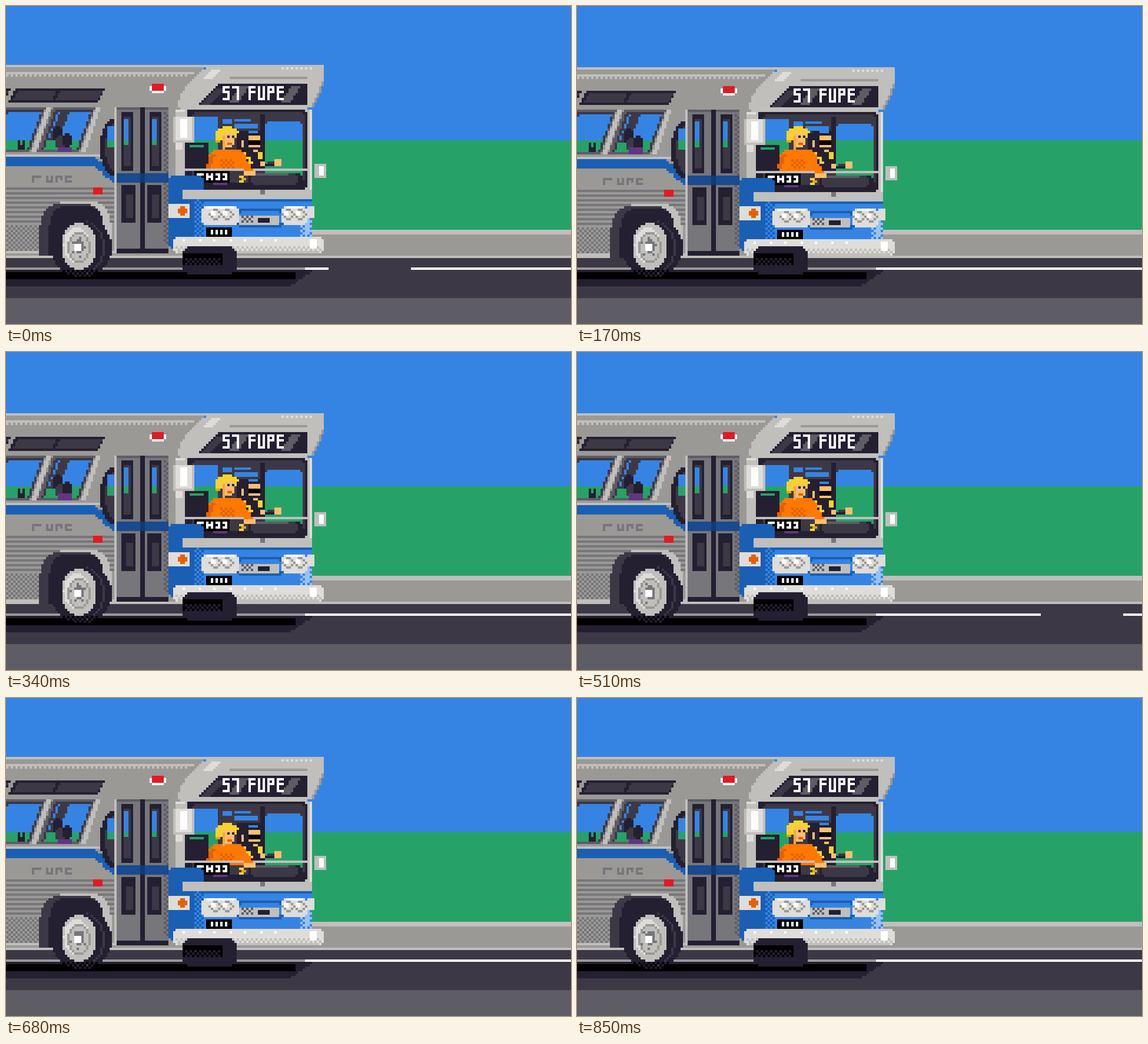
Recreate the animation shown at these times as an HTML page with a canvas. Size 960 by 540 pixels, loop 1.02 s.

```html
<!DOCTYPE html>
<html lang="en">
<head>
<meta charset="utf-8">
<title>Bus ride</title>
<style>
  html, body { margin: 0; width: 100%; height: 100%; overflow: hidden; background: #3584e4; }
  canvas { display: block; width: 960px; height: 540px; image-rendering: pixelated; }
</style>
</head>
<body>
<canvas id="stage" width="240" height="135"></canvas>
<script>
const ctx = document.getElementById('stage').getContext('2d');
const STEP = 170, COUNT = 6, HORIZON = 57;
const SKY = '#3584e4', GRASS = '#26a269', GLASS = 'glass';
const BLACK = '#000', INK = '#241f31', DARK = '#3d3846', SLATE = '#5e5c64', STEEL = '#77767b';
const GRAY = '#9a9996', SILVER = '#c0bfbc', PALE = '#deddda', WHITE = '#fff';
const NAVY = '#1a5fb4', RED = '#e01b24', ORANGE = '#ff7800', RUST = '#e66100';
const SKIN = '#ffbe6f', TAN = '#ffa348', GOLD = '#e5a50a', YELLOW = '#f6d32d', PURPLE = '#613583';

let oy = 0; // vertical offset of the part being drawn

// Glass shows the scenery behind, split at the fixed horizon
function row(c, x, y, w) {
  y += oy;
  ctx.fillStyle = c === GLASS ? (y < HORIZON ? SKY : GRASS) : c;
  ctx.fillRect(Math.round(x), y, Math.round(w), 1);
}

function rect(c, x, y, w, h = 1) {
  for (let j = 0; j < h; j++) row(c, x, y + j, w);
}

function dots(c, x, y, w, h) {
  for (let j = 0; j < h; j++)
    for (let i = j % 2; i < w; i += 2) row(c, x + i, y + j, 1);
}

// Rounded rectangle
function box(c, x, y, w, h, r = 1) {
  for (let j = 0; j < h; j++) {
    const d = Math.max(0, r - Math.min(j, h - 1 - j) - 0.5);
    const inset = Math.round(r - Math.sqrt(r * r - d * d));
    row(c, x + inset, y + j, w - 2 * inset);
  }
}

// Parallelogram leaning left by dx towards its foot
function slant(c, x, y, w, h, dx) {
  for (let j = 0; j < h; j++) row(c, x - Math.round(dx * (j + 0.5) / h), y + j, w);
}

// Arch that widens downwards, squarer for larger n
function dome(c, x, y, w, h, n = 4) {
  for (let j = 0; j < h; j++) {
    const half = Math.round(w / 2 * (1 - (1 - (j + 0.5) / h) ** n) ** (1 / n));
    row(c, x + w / 2 - half, y + j, 2 * half);
  }
}

function oval(c, x, y, w, h) {
  for (let j = 0; j < h; j++) {
    const t = (2 * j + 1) / h - 1;
    const half = Math.round(w / 2 * Math.sqrt(1 - t * t));
    row(c, x + w / 2 - half, y + j, 2 * half);
  }
}

const segments = {
  5: 'afgcd', 7: 'abc', 3: 'abgcd', C: 'afed', E: 'afged', F: 'afge',
  H: 'fegbc', P: 'abfge', U: 'febcd'
};

// Segment lettering, w by h cells per glyph
function sign(text, c, x, y, h, w = 3) {
  const mid = Math.floor((h - 1) / 2);
  [...text].forEach((ch, i) => {
    const px = x + i * (w + 1), has = s => (segments[ch] || '').includes(s);
    if (has('a')) rect(c, px, y, w);
    if (has('g') && (h > 3 || !has('a'))) rect(c, px, y + mid, w);
    if (has('d')) rect(c, px, y + h - 1, w);
    if (has('f')) rect(c, px, y, 1, mid + 1);
    if (has('e')) rect(c, px, y + mid, 1, h - mid);
    if (has('b')) rect(c, px + w - 1, y, 1, mid + 1);
    if (has('c')) rect(c, px + w - 1, y + mid, 1, h - mid);
  });
}

function scenery(i) {
  rect(SKY, 0, 0, 240, HORIZON);
  rect(GRASS, 0, HORIZON, 240, 38);
  rect(SILVER, 0, 95, 240, 2);
  rect(GRAY, 0, 97, 240, 9);
  rect(SILVER, 0, 106, 240);
  rect(DARK, 0, 107, 240, 17);
  rect(SLATE, 0, 124, 240, 11);

  // the gap in the lane line runs one stage width per step
  const loop = 780, gap = (137 - 240 * i + 2 * loop) % loop;
  rect(GRAY, 0, 111, 127);
  rect(WHITE, 127, 111, 113);
  rect(DARK, gap, 111, 35);

  for (let j = 0; j < 7; j++) rect(INK, 0, 112 + j, 130 - 1.5 * j);
  rect(BLACK, 0, 113, 123, 3);
}

function side() {
  rect(GRAY, 0, 25, 84, 80);
  rect(SILVER, 0, 25, 90);
  rect(SILVER, 0, 28, 80);
  dots(SILVER, 0, 29, 78, 1);

  for (const x of [-18, 4, 22]) {
    slant(INK, x, 35, 20, 6, 3);
    slant(DARK, x + 1, 36, 18, 4, 2);
  }
  for (const x of [-1, 20]) {
    slant(SLATE, x, 43, 18, 19, 7);
    slant(DARK, x + 1, 44, 16, 17, 6);
    slant(GLASS, x + 2, 45, 14, 16, 6);
    slant(SILVER, x + 18, 43, 2, 19, 6);
  }
  slant(DARK, 23, 45, 4, 12, 5);

  rect(SILVER, 0, 63, 40);
  for (let x = 0; x < 47; x++) {
    const t = Math.min(1, Math.max(0, (x - 36) / 10));
    rect(NAVY, x, 64 + Math.round(7 * t * t * (3 - 2 * t)), 1, 4);
  }

  sign('F', STEEL, 11, 72, 3, 4);
  sign('UPE', STEEL, 17, 72, 3);

  for (let y = 77; y < 92; y += 2) rect(STEEL, 0, y, 47);
  dots(STEEL, 0, 93, 15, 11);
  rect(SILVER, 0, 104, 46);
  rect(WHITE, 61, 34, 7, 2);
  rect(WHITE, 62, 36, 5);
  rect(RED, 62, 33, 5, 3);
  rect(RED, 37, 77, 4, 3);

  oval(INK, 40, 48, 12, 24);
  oval(DARK, 42, 50, 10, 20);
  rect(GLASS, 43, 51, 3, 9);
}

function passengers(drop) {
  for (const x of [5, 7]) rect(INK, x, 57, 1, 4);
  rect(INK, 5, 59, 3, 2);
  oval(INK, 20, 51, 4, 7);
  oval(DARK, 21, 55, 4, 6);
  oval(INK, 24, 54, 4, 6);
  rect(PURPLE, 22, 60 - drop, 6, 2 + drop);
}

function door() {
  rect(SILVER, 46, 43, 1, 62);
  rect(STEEL, 47, 43, 22, 61);
  rect(SLATE, 47, 43, 22);
  dots(SLATE, 67, 45, 2, 56);
  rect(INK, 57, 43, 2, 61);
  for (const [top, low] of [[49, 49], [61, 60]]) {
    box(INK, top, 45, 5, 25, 1.5);
    rect(DARK, top + 1, 47, 3, 21);
    rect(GLASS, top + 1, 48, 2, 11);
    rect(INK, low, 76, 6, 16);
    rect(DARK, low + 2, 80, 3, 10);
  }
  rect('#1a4a8f', 47, 71, 22, 4);
  rect('#123a73', 57, 71, 2, 4);
  rect(INK, 47, 103, 22, 2);
}

function brow() {
  for (let j = 0; j < 18; j++) {
    const left = Math.round(73 + 13 * (1 - j / 18) ** 2);
    const right = Math.round(130 + 5 * Math.cos((j - 4) / 14 * Math.PI / 2));
    rect(SILVER, left, 25 + j, right - left);
    if (j > 1 && j < 6) rect(PALE, left + 4, 25 + j, 4);
    if (j > 6) rect(GRAY, right - 1, 25 + j, 1);
  }
  dots(PALE, 117, 26, 13, 1);
  rect(GRAY, 95, 30, 33);

  for (let j = 0; j < 9; j++) rect(INK, 90 - j, 33 + j, 38 + j);
  slant(DARK, 89, 35, 4, 7, 6);
  slant(SLATE, 99, 34, 4, 7, 4);
  slant(SLATE, 121, 34, 4, 7, 4);
  sign('57', WHITE, 92, 34, 6);
  sign('FUPE', WHITE, 103, 34, 6);
}

function cab() {
  box(SILVER, 72, 43, 58, 39, 4);
  rect(PALE, 129, 44, 1, 36);
  box(INK, 76, 44, 52, 34, 3);
  box(DARK, 79, 45, 48, 30, 2);
  rect(GLASS, 80, 47, 10, 22);
  box(INK, 76, 58, 10, 12);
  rect(GLASS, 78, 59, 6);
  rect(DARK, 90, 46, 20, 23);
  rect(GLASS, 92, 48, 4, 2);
  rect(GLASS, 97, 48, 7);
  rect(GLASS, 97, 50, 10, 2);
  rect(INK, 98, 53, 10, 16);
  rect(INK, 108, 46, 2, 23);
  box(GLASS, 110, 49, 16, 28, 2);
}

function rider(head, torso) {
  oy = torso;
  dome(ORANGE, 85, 61, 17, 9);
  slant(RUST, 87, 63, 2, 6, 2);
  dots(RUST, 91, 65, 6, 4);

  oy = head;
  oval(YELLOW, 89, 51, 9, 6);
  rect(YELLOW, 89, 53, 10);
  rect(YELLOW, 89, 54, 3, 3);
  rect(GOLD, 89, 57, 2);
  rect(SKIN, 92, 54, 5, 5);
  rect(TAN, 92, 55, 1, 6);
  rect(SKIN, 93, 59, 3);
  rect(YELLOW, 92, 53, 6);
  for (const x of [94, 96]) rect(INK, x, 55, 1);
  rect(RUST, 94, 58, 2);
}

function driver(head, torso) {
  oy = head;
  box(INK, 99, 53, 10, 10, 2);
  rect(SKY, 103, 53, 4);
  rect(SKIN, 103, 55, 5, 6);
  rect(BLACK, 103, 57, 5, 2);
  rect(SKIN, 100, 57, 1, 3);
  rect(INK, 102, 60, 6);
  rect(SKIN, 105, 61, 2);

  oy = torso;
  dome(INK, 98, 62, 12, 8);
  for (let j = 0; j < 5; j++) rect(YELLOW, 100 + Math.min(j, 3), 62 + j, 2 - j % 2);
  rect(YELLOW, 107, 62, 2, 3);
}

function dash() {
  box(INK, 103, 71, 23, 7, 2);
  box(DARK, 104, 71, 20, 5, 2);
  rect(SLATE, 106, 71, 14);
  rect(DARK, 111, 66, 4);
  rect(INK, 110, 67, 7);
  rect(SKIN, 108, 66, 2, 2);
  rect(SKIN, 114, 65, 3, 3);
  rect(SILVER, 76, 69, 52);
  slant(ORANGE, 98, 65, 4, 6, -4);
  rect(SKIN, 101, 70, 5, 2);
  for (let j = 0; j < 3; j++) rect(j % 2 ? GOLD : YELLOW, 99 + j % 2, 72 + j, 2);
  rect(BLACK, 80, 70, 15, 5);
  sign('CH', WHITE, 81, 71, 3);
  sign('33', WHITE, 89, 71, 3, 2);
  rect(PURPLE, 88, 75, 6);
}

function lamp(x, w) {
  box(PALE, x, 85, w, 8, 2);
  rect(WHITE, x + 2, 85, w - 4);
  for (const i of [-5, 0]) {
    const px = Math.floor(x + w / 2) + i;
    oval(GRAY, px, 86, 5, 5);
    oval(PALE, px + 1, 87, 3, 3);
    rect(WHITE, px + 1, 87, 2, 2);
  }
}

function nose() {
  box(NAVY, 69, 72, 15, 31, 3);
  rect(SKY, 80, 82, 50, 16);
  dots(NAVY, 78, 82, 6, 16);
  box(SILVER, 75, 78, 55, 4, 1);
  rect(NAVY, 82, 82, 48);
  rect(STEEL, 108, 78, 2, 2);
  dots('#99c1f1', 125, 89, 5, 9);
  rect('#99c1f1', 127, 91, 2, 6);

  box(NAVY, 98, 86, 20, 8, 2);
  box(SKY, 99, 87, 18, 6, 2);
  box(SILVER, 99, 89, 17, 4, 1);
  dots(SLATE, 100, 89, 5, 3);
  rect(INK, 107, 90, 5, 2);
  lamp(83, 16);
  lamp(117, 11);
  rect(PALE, 128, 85, 3, 5);

  rect(BLACK, 85, 94, 11, 4);
  for (let x = 87; x < 95; x += 2) rect(WHITE, x, 95, 1, 2);

  rect(PALE, 69, 84, 9, 6);
  rect(RUST, 74, 85, 2, 4);
  rect(RUST, 73, 86, 4, 2);

  box(PALE, 71, 98, 64, 7, 2);
  dots(SILVER, 72, 102, 62, 2);
  rect(SILVER, 73, 104, 60);
  for (let x = 75; x < 120; x += 6.5) rect(WHITE, x, 99, 1);
  rect(WHITE, 129, 99, 3, 4);
}

function mirrors() {
  rect(PALE, 72, 44, 4);
  rect(SILVER, 75, 45, 2, 2);
  box(SILVER, 71, 47, 9, 11, 1.5);
  box(PALE, 72, 47, 7, 10, 1.5);
  rect(WHITE, 74, 48, 3, 8);
  rect(PALE, 72, 58, 3, 3);
  box(SILVER, 131, 67, 5, 6, 1.5);
  rect(WHITE, 133, 68, 2, 4);
}

function wheels(i) {
  oval(INK, 19, 90, 26, 25);
  oval(DARK, 22, 91, 20, 23);
  oval(INK, 21, 91, 20, 23);
  dots(BLACK, 24, 112, 16, 3);
  oval(SILVER, 23, 92, 15, 20);
  oval(PALE, 24, 94, 11, 15);
  oval(GRAY, 26, 96, 10, 13);
  oval(SILVER, 27, 97, 8, 11);
  for (let k = 0; k < 5; k++) {
    const a = (k / 5 + i / COUNT) * Math.PI * 2;
    rect(STEEL, 30 + 3 * Math.cos(a), Math.round(102 + 4 * Math.sin(a)), 1);
  }
  oval(STEEL, 28, 99, 5, 6);
  rect(WHITE, 29, 101, 3, 3);

  box(INK, 75, 102, 23, 12, 4);
  rect(BLACK, 75, 105, 17, 5);
  dots(INK, 76, 107, 15, 4);
}

function draw(i) {
  const turn = Math.PI * 2 / COUNT;
  const drop = Math.sin((i - 0.5) * turn) > 0 ? 1 : 0;
  const bob = Math.round(1 - Math.cos((i - 0.5) * turn));
  const nod = Math.floor(1 - Math.cos(i * turn) + 1e-6);
  const torso = Math.min(1, bob);

  oy = 0;
  scenery(i);
  oy = drop;
  side();
  passengers(drop);
  dome(SILVER, 17, 83, 28, 22);
  dome(DARK, 14, 84, 28, 22);
  dome(INK, 18, 85, 24, 21);
  door();
  cab();
  driver(nod, torso);
  rider(bob, torso);
  oy = drop;
  dash();
  brow();
  nose();
  mirrors();
  oy = 0;
  wheels(i);
}

let shown = -1;
const start = performance.now();

function tick() {
  const i = Math.floor((performance.now() - start) / STEP) % COUNT;
  if (i !== shown) draw(shown = i);
  requestAnimationFrame(tick);
}
tick();
</script>
</body>
</html>
```
